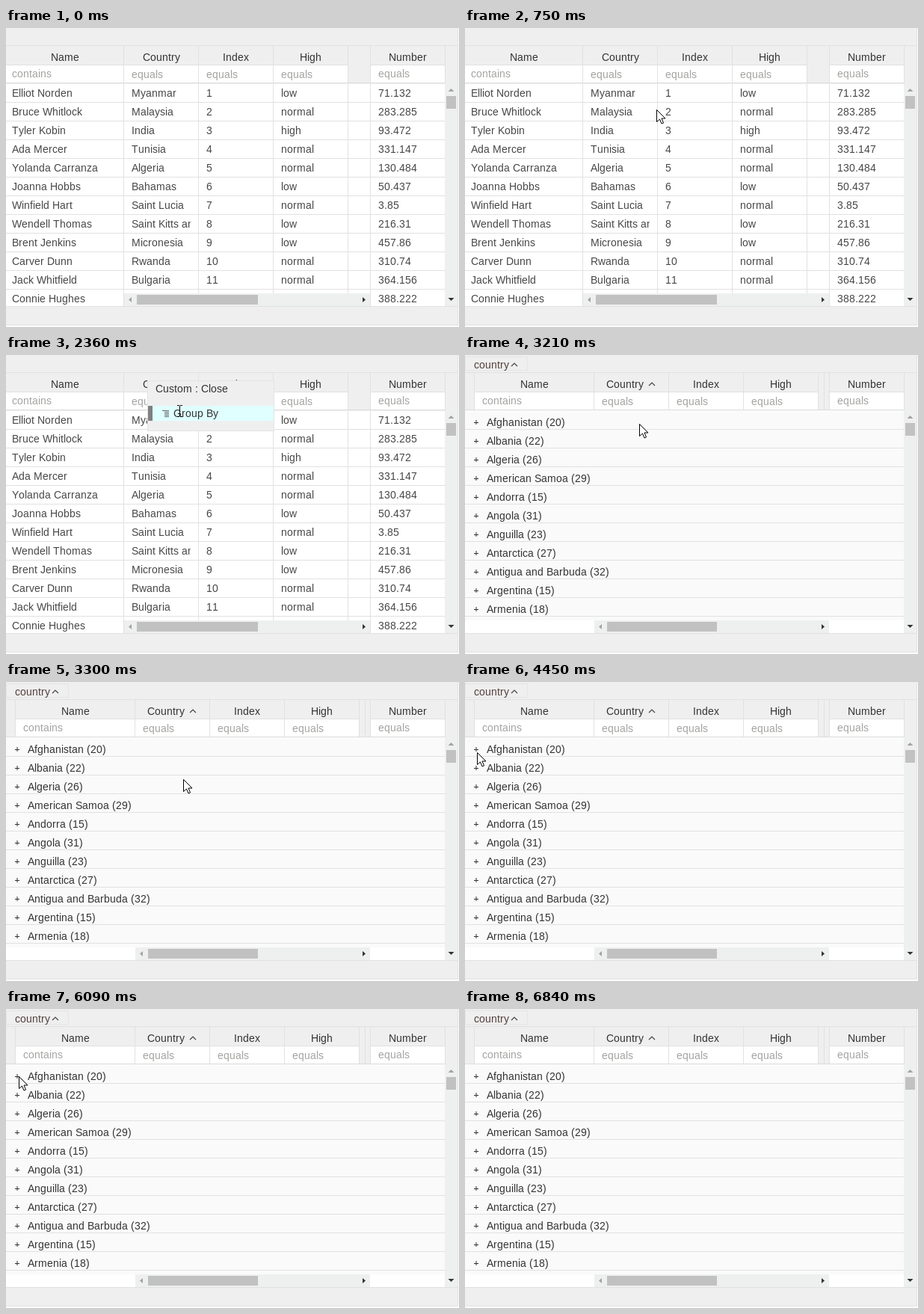
An HTML page with a canvas that plays this animation: 606 px wide and 400 px high, repeating every 7620 ms.

```html
<!DOCTYPE html>
<html>
<head>
<meta charset="utf-8">
<style>
html, body { margin: 0; width: 100%; height: 100%; overflow: hidden; background: #fff; }
canvas { display: block; }
</style>
</head>
<body>
<canvas id="stage" width="606" height="400"></canvas>
<script>
const LOOP = 7620;
const g = document.getElementById('stage').getContext('2d');
const LINE = '#e1e1e1', PANEL = '#efefef', INK = '#474747', DARK = '#333';

const plainRows = `Elliot Norden|Myanmar|1|low|71.132
Bruce Whitlock|Malaysia|2|normal|283.285
Tyler Kobin|India|3|high|93.472
Ada Mercer|Tunisia|4|normal|331.147
Yolanda Carranza|Algeria|5|normal|130.484
Joanna Hobbs|Bahamas|6|low|50.437
Winfield Hart|Saint Lucia|7|normal|3.85
Wendell Thomas|Saint Kitts and Nevis|8|low|216.31
Brent Jenkins|Micronesia|9|low|457.86
Carver Dunn|Rwanda|10|normal|310.74
Jack Whitfield|Bulgaria|11|normal|364.156
Connie Hughes||||388.222`.split('\n').map(r => r.split('|'));

const openRows = `Harrison Thornton|2267|high|34.373
Annette Goodwin|2853|high|407.478
Della Boyer|4479|normal|285.299
Conrad Kent|821|low|206.194
Regina Salazar|3754|normal|260.434
Santiago Boyd|4380|high|446.334
Florence Larson|2837|high|498.305
Floyd Becker|3395|normal|78.384
Suzanne Whitfield|4695|low|225.499
Lillian Burke|2317|low|324.488
Albert Hodges|||275.475`.split('\n').map(r => {
  const [name, ...rest] = r.split('|');
  return [name, 'Afghanistan', ...rest];
});

const groups = ['Afghanistan (20)', 'Albania (22)', 'Algeria (26)', 'American Samoa (29)',
  'Andorra (15)', 'Angola (31)', 'Anguilla (23)', 'Antarctica (27)',
  'Antigua and Barbuda (32)', 'Argentina (15)', 'Armenia (18)'];

// Cursor moves: start, end, number of steps, way points
const moves = [
  [220, 900, 10, [[485, 371], [191, 34]]],
  [1050, 1050, 1, [[191, 36]]],
  [1830, 2360, 8, [[200, 44], [290, 71], [232, 75]]],
  [3210, 3380, 3, [[233, 92], [237, 130], [237, 134]]],
  [3600, 4210, 9, [[235, 142], [190, 160], [100, 140], [15, 90], [15, 95]]],
  [4450, 4450, 1, [[16, 94]]],
  [4830, 5220, 6, [[16, 94], [17, 91]]],
  [5390, 5390, 1, [[17, 90]]],
  [6390, 6765, 6, [[35, 102], [429, 385]]]
];

function cursorAt(t) {
  if (t < 220 || t >= 6840) return null;
  const [t0, t1, n, pts] = moves.filter(m => t >= m[0]).pop();
  if (n === 1) return pts[0];
  const step = Math.min(n - 1, Math.floor((t - t0) / (t1 - t0) * (n - 1) + 1e-6));
  const u = step / (n - 1) * (pts.length - 1);
  const i = Math.min(pts.length - 2, Math.floor(u)), f = u - i;
  return [0, 1].map(a => Math.round(pts[i][a] + (pts[i + 1][a] - pts[i][a]) * f));
}

function box(x, y, w, h, color) {
  g.fillStyle = color;
  g.fillRect(x, y, w, h);
}
const hLine = (x, y, w, color = LINE) => box(x, y, w, 1, color);
const vLine = (x, y, h, color = LINE) => box(x, y, 1, h, color);

function frame(x, y, w, h, color) {
  g.strokeStyle = color;
  g.lineWidth = 1;
  g.strokeRect(x + .5, y + .5, w - 1, h - 1);
}

// Letters advance by whole pixels, as in hinted screen type
const advance = c => Math.round(g.measureText(c).width);

function text(s, x, y, color = INK, centered = false) {
  g.font = '14px "Liberation Sans", Arial, sans-serif';
  g.fillStyle = color;
  const letters = [...s];
  if (centered) x = Math.round(x - letters.reduce((w, c) => w + advance(c), 0) / 2);
  for (const c of letters) {
    g.fillText(c, x, y);
    x += advance(c);
  }
}

function clipped(s, x, y, w) {
  g.save();
  g.beginPath();
  g.rect(x, y - 15, w, 20);
  g.clip();
  text(s, x, y);
  g.restore();
}

function poly(points, fill, stroke) {
  g.beginPath();
  points.forEach(([x, y]) => g.lineTo(x, y));
  g.closePath();
  if (fill) { g.fillStyle = fill; g.fill(); }
  if (stroke) { g.strokeStyle = stroke; g.lineWidth = 1; g.stroke(); }
}

function caret(x, y) {
  g.beginPath();
  g.moveTo(x, y + 4);
  g.lineTo(x + 4, y);
  g.lineTo(x + 8, y + 4);
  g.strokeStyle = '#444';
  g.lineWidth = 1.2;
  g.stroke();
}

function columns(grouped) {
  const d = grouped ? 15 : 0, left = grouped ? 13 : 0;
  return [[left, 157 + d], [158 + d, 257 + d], [258 + d, 357 + d], [358 + d, 457 + d], [488, 587]];
}

function header(cols, grouped) {
  box(0, 0, 605, 398, PANEL);
  hLine(0, 23, 605);
  ['Name', 'Country', 'Index', 'High', 'Number'].forEach((name, i) => {
    const [a, b] = cols[i];
    const sorted = grouped && i === 1;
    box(a, 50, b - a, 23, '#fff');
    hLine(a, 49, b - a);
    vLine(b, 24, 49);
    text(name, (a + b) / 2 + (sorted ? -9 : 0), 44, DARK, true);
    const middle = i > 0 && i < 4;
    text(i ? 'equals' : 'contains', a + (i || grouped ? 10 : 8), middle ? 67 : 66, '#a3a3a0');
  });
  vLine(487, 24, 49);
  if (grouped) {
    vLine(12, 24, 49);
    vLine(480, 24, 49);
    caret(246, 37);
  }
  hLine(0, 73, 588, '#dcdcdc');
}

function cells(rows, cols, baseline, grouped) {
  const top = baseline - 17;
  box(0, top, 588, 372 - top, '#fff');
  if (grouped) {
    box(0, top, 12, 372 - top, '#f8f8f8');
    vLine(12, top, 372 - top);
  }
  cols.forEach(([a, b]) => vLine(b, top, 372 - top));
  vLine(487, top, 372 - top);
  rows.forEach((row, r) => {
    const y = baseline + r * 25;
    if (y < 360) hLine(0, y + 7, 588);
    row.forEach((s, c) => {
      const x = cols[c][0] + (c || grouped ? 10 : 8);
      clipped(s, x, y, cols[c][1] - x - 10);
    });
  });
}

function groupRow(r, open) {
  const y = 74 + r * 25;
  box(0, y, 588, 25, '#fafafa');
  hLine(0, y + 25, 588);
  hLine(12, y + 16, 6, DARK);
  if (!open) box(14.5, y + 13, 1, 6, DARK);
  text(groups[r], 29, y + 21, DARK);
}

function scrollbars(x) {
  const track = '#eef0ef', thumb = '#c1c1c1', faded = '#a3a3a3', strong = '#333';
  box(587, 74, 17, 298, track);
  box(589, 91, 13, 17, thumb);
  poly([[591.5, 85], [595.5, 81], [599.5, 85]], faded);
  poly([[591.5, 361], [595.5, 365], [599.5, 361]], strong);
  box(x, 355, 487 - x, 17, track);
  box(x + 17, 357, 337 - x - 17, 13, thumb);
  poly([[x + 10, 360], [x + 6, 363.5], [x + 10, 367]], faded);
  poly([[477, 360], [481, 363.5], [477, 367]], strong);
}

function menu(hover) {
  box(189, 34, 170, 68, PANEL);
  frame(189, 34, 170, 68, '#e4e4e4');
  text('Custom : Close', 200, 50, DARK);
  const d = hover ? 6 : 0;
  if (hover) {
    box(190, 68, 168, 20, '#e0ffff');
    box(190, 68, 6, 20, '#808080');
  }
  hLine(203 + d, 74, 9, '#666');
  for (let y = 76; y < 83; y += 2) hLine(206 + d, y, 6, '#666');
  text('Group By', 218 + d, 83, DARK);
}

function pointer(kind, x, y) {
  g.save();
  g.translate(x + .5, y + .5);
  if (kind === 'arrow') {
    poly([[0, 0], [0, 16], [4, 12.5], [6.5, 18.5], [9, 17.5], [6.5, 11.5], [11.5, 11.5]], '#fff', '#000');
  } else if (kind === 'beam') {
    for (const y of [-8, 7]) { box(-3.5, y - .5, 3, 1, '#000'); box(.5, y - .5, 3, 1, '#000'); }
    box(-.5, -7.5, 1, 14, '#000');
  } else {
    const arm = [[-1.5, -1.5], [-1.5, -7], [-4, -7], [0, -11], [4, -7], [1.5, -7]];
    const turn = ([a, b], q) => q ? turn([-b, a], q - 1) : [a, b];
    poly([0, 1, 2, 3].flatMap(q => arm.map(p => turn(p, q))), '#fff', '#000');
  }
  g.restore();
}

function draw(t) {
  const grouped = t >= 3210, open = t >= 4830 && t < 6090;
  const cols = columns(grouped), cur = cursorAt(t);
  g.clearRect(0, 0, 606, 400);
  header(cols, grouped);

  if (!grouped) {
    cells(plainRows, cols, 92, false);
  } else if (open) {
    cells(openRows, cols, 117, true);
    groupRow(0, true);
  } else {
    box(0, 350, 588, 5, '#fafafa');
    box(0, 355, 588, 17, '#fff');
    // Bottom up, so that each row's lower line stays on top
    for (let r = groups.length - 1; r >= 0; r--) groupRow(r, false);
  }
  scrollbars(grouped ? 173 : 158);

  box(0, 372, 605, 25, PANEL);
  hLine(0, 372, 605);
  hLine(0, 397, 605);
  vLine(604, 0, 398);

  if (t >= 2900) {
    frame(0, 2, 84, 19, '#e5e5e5');
    text('country', 12, 18, '#53403c');
    if (grouped) caret(62, 11);
  }

  const menuOn = t >= 1450 && t < 2900;
  if (menuOn) menu(t >= 1830 && cur[1] >= 68);
  if (!cur) return;

  const [x, y] = cur;
  let kind = 'arrow';
  if (t < 1830 && y < 49) kind = 'move';
  else if (menuOn && y >= 68 && x >= 218 && x < 285) kind = 'beam';
  pointer(kind, x, y);
}

function tick(now) {
  draw(now % LOOP);
  requestAnimationFrame(tick);
}
requestAnimationFrame(tick);
</script>
</body>
</html>
```
